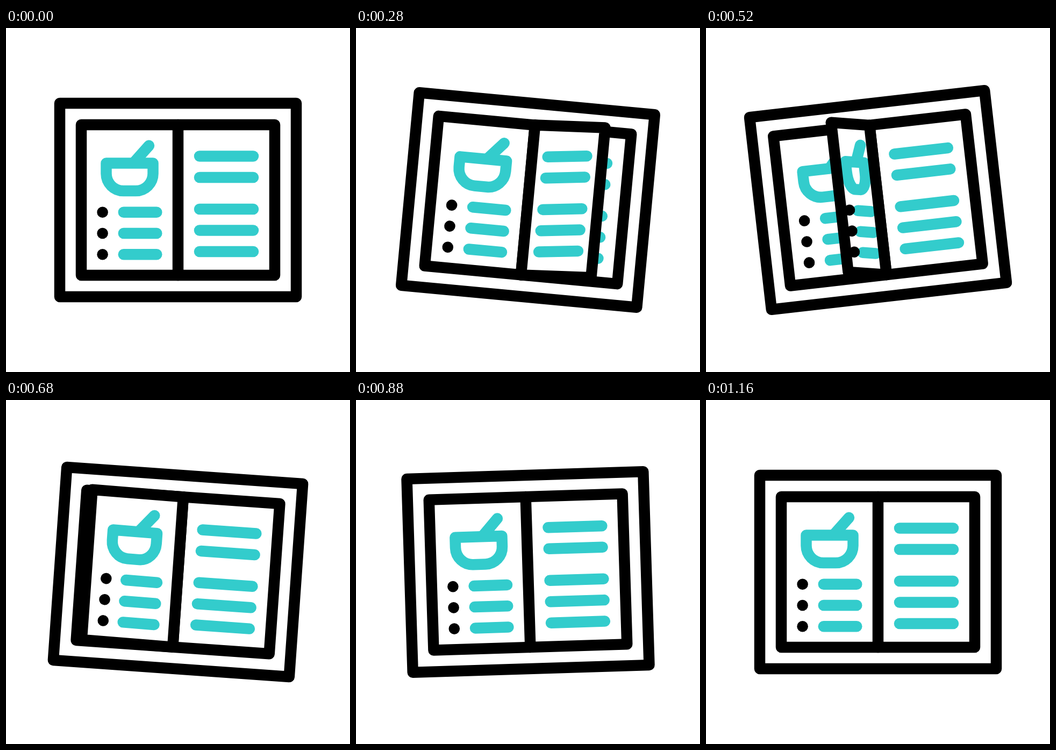
These frames come from a looping animation (640x640 px, 1.24 s). An HTML page with a canvas:

```html
<!DOCTYPE html>
<html lang="en">
<head>
<meta charset="utf-8">
<title>Recipe book</title>
<style>
  html, body { margin: 0; width: 100%; height: 100%; overflow: hidden; background: #fff; }
  canvas { display: block; width: 100vw; height: 100vh; }
</style>
</head>
<body>
<canvas id="stage" width="640" height="640"></canvas>
<script>
const ctx = document.getElementById('stage').getContext('2d');
const LOOP = 1240, STEP = 40;
const INK = '#000', TEAL = '#33cccc', LINE = 20.5;
const SPINE = 320, HALF = 180, TOP = 180, BOTTOM = 460;
const FLIP_START = 140, FLIP_END = 740, LIFT = 15.5;

// time in ms, tilt in degrees
const TILT = [[50, 0], [220, 7], [500, -7], [660, 4.15], [900, -1.9], [1150, 0]];

const clamp = v => Math.min(1, Math.max(0, v));
const ease = v => v * v * (3 - 2 * v);

function tiltAt(t) {
  for (let i = 1; i < TILT.length; i++) {
    const [t0, a] = TILT[i - 1], [t1, b] = TILT[i];
    if (t <= t1) return a + (b - a) * ease(clamp((t - t0) / (t1 - t0)));
  }
  return 0;
}

const flat = (x, y) => [x, y];

function stroke(color) {
  ctx.strokeStyle = color;
  ctx.lineWidth = LINE;
  ctx.stroke();
}

function polygon(points) {
  ctx.beginPath();
  points.forEach(p => ctx.lineTo(...p));
  ctx.closePath();
}

function line(map, x0, y0, x1, y1, color) {
  ctx.beginPath();
  ctx.moveTo(...map(x0, y0));
  ctx.lineTo(...map(x1, y1));
  stroke(color);
}

function box(l, t, r, b) {
  polygon([[l, t], [r, t], [r, b], [l, b]]);
}

function mortar(map) {
  const l = 186.5, r = 273.5, top = 251.5, low = 303, rad = 32, k = rad * 0.4477;
  const side = low - rad;
  ctx.beginPath();
  ctx.moveTo(...map(l, top));
  ctx.lineTo(...map(r, top));
  ctx.lineTo(...map(r, side));
  ctx.bezierCurveTo(...map(r, low - k), ...map(r - k, low), ...map(r - rad, low));
  ctx.lineTo(...map(l + rad, low));
  ctx.bezierCurveTo(...map(l + k, low), ...map(l, low - k), ...map(l, side));
  ctx.closePath();
  stroke(TEAL);
  line(map, 266, 218.8, 239, 249, TEAL);
}

function leftPage(map) {
  mortar(map);
  for (const y of [342.8, 382, 421.3]) {
    line(map, 218.8, y, 280.3, y, TEAL);
    ctx.fillStyle = INK;
    ctx.beginPath();
    ctx.arc(...map(179.6, y), 10.3, 0, Math.PI * 2);
    ctx.fill();
  }
}

function rightPage(map) {
  for (const y of [238.5, 278, 337, 376.5, 416]) line(map, 360, y, 460, y, TEAL);
}

function turningPage(t) {
  const open = 1 - 2 * ease((t - FLIP_START) / (FLIP_END - FLIP_START));
  const arch = 1 - open * open;
  const edge = SPINE + HALF * open, rise = LIFT * arch;
  const sheet = [[SPINE, TOP], [edge, TOP - rise], [edge, BOTTOM - rise], [SPINE, BOTTOM]];
  polygon(sheet);
  ctx.fillStyle = '#fff';
  ctx.fill();

  // stroke weight stays constant: only the points are folded
  const fold = drop => (x, y) => {
    const u = Math.abs(x - SPINE);
    return [SPINE + (x - SPINE) * Math.abs(open), y - arch * drop(u)];
  };
  if (open > 0) rightPage(fold(u => 0.178 * u - 3.5));
  else leftPage(fold(u => LIFT * u / HALF));

  polygon(sheet);
  stroke(INK);
}

function draw(t) {
  ctx.setTransform(1, 0, 0, 1, 0, 0);
  ctx.fillStyle = '#fff';
  ctx.fillRect(0, 0, 640, 640);
  ctx.lineCap = ctx.lineJoin = 'round';
  ctx.translate(320, 320);
  ctx.rotate(tiltAt(t) * Math.PI / 180);
  ctx.translate(-320, -320);

  box(100, 140, 540, 500);
  stroke(INK);
  leftPage(flat);
  rightPage(flat);
  box(SPINE - HALF, TOP, SPINE + HALF, BOTTOM);
  stroke(INK);
  line(flat, SPINE, TOP, SPINE, BOTTOM, INK);
  if (t > FLIP_START && t < FLIP_END) turningPage(t);
}

const start = performance.now();
function tick() {
  const t = Math.max(0, performance.now() - start) % LOOP;
  draw(Math.floor(t / STEP) * STEP);
  requestAnimationFrame(tick);
}
tick();
</script>
</body>
</html>
```
